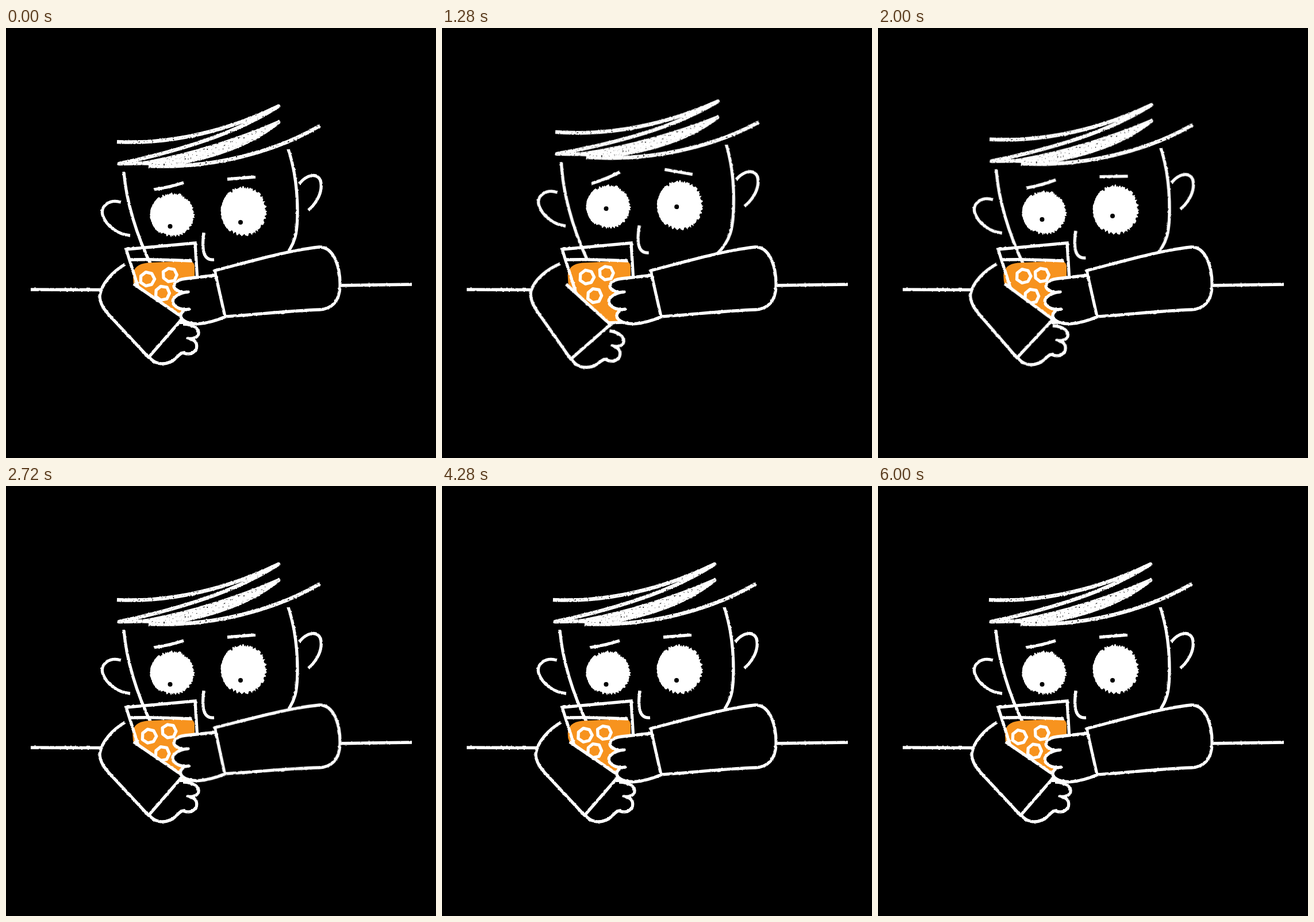
Recreate the animation shown at these times as an HTML page. Size 748 by 748 pixels, loop 6040 ms.

```html
<!DOCTYPE html>
<html lang="en">
<head>
<meta charset="utf-8">
<title>Quiet drink</title>
<style>
  html, body { margin: 0; width: 100%; height: 100%; overflow: hidden; background: #000; }
  svg { display: block; width: 100vw; height: 100vh; }
  .line { fill: none; stroke: #fff; stroke-width: 5.3; stroke-linejoin: round; }
  .hair { stroke-width: 6.5; }
  .solid { fill: #000; }
  .rough { filter: url(#rough); }
  .grain { filter: url(#grain); }
</style>
</head>
<body>
<svg viewBox="0 0 748 748">
  <defs>
    <filter id="rough" filterUnits="userSpaceOnUse" x="0" y="0" width="748" height="748" color-interpolation-filters="sRGB">
      <feTurbulence type="fractalNoise" baseFrequency=".2" numOctaves="2" seed="4"/>
      <feDisplacementMap in="SourceGraphic" scale="2.5" xChannelSelector="R" yChannelSelector="G"/>
    </filter>
    <filter id="grain" filterUnits="userSpaceOnUse" x="0" y="0" width="748" height="748" color-interpolation-filters="sRGB">
      <feTurbulence type="fractalNoise" baseFrequency=".3" numOctaves="2" seed="7" result="noise"/>
      <feColorMatrix in="noise" values="0 0 0 0 0  0 0 0 0 0  0 0 0 0 0  0 0 0 -6 5" result="holes"/>
      <feDisplacementMap in="SourceGraphic" in2="noise" scale="2.5" xChannelSelector="R" yChannelSelector="G"/>
      <feComposite in2="holes" operator="in"/>
    </filter>
  </defs>
  <rect width="748" height="748"/>

  <path class="line rough" d="M43 455L175 455.5M570 448L706 446"/>

  <g id="head">
    <g class="line rough">
      <path d="M205 250C209 300 226 360 256 420"/>
      <path d="M491 211C504 250 507 285 507 320C507 355 504 378 480 402"/>
      <path d="M200 303C180 297 164 310 168 325C174 344 194 359 216 361"/>
      <path d="M510 271C524 254 541 252 547 265C552 284 541 304 526 317"/>
      <path d="M344 356C340 388 344 405 362 403"/>
      <path id="browL" d="M257 281Q285 277 309 269"/>
      <path id="browR" d="M385 263L434 259"/>
    </g>
    <g class="line hair grain">
      <path d="M193 198C290 203 390 177 474 136C400 184 300 214 197 236L250 235"/>
      <path d="M240 235C320 222 410 192 474 164C430 200 360 227 285 237Z" fill="#fff"/>
      <path d="M248 240C360 245 470 215 546 170"/>
    </g>
    <path id="eyeL" fill="#fff"/>
    <path id="eyeR" fill="#fff"/>
    <g id="pupils">
      <circle cx="285.5" cy="345" r="4"/>
      <circle cx="408" cy="338" r="4"/>
    </g>
  </g>

  <path id="juice" fill="#f7931e"/>
  <path class="line rough" style="stroke-linejoin: miter" d="M250 514L209 385L329 374L333 440L318 512L255 514M216 403Q270 402 323 405"/>
  <g id="bubbles" class="line"></g>

  <g id="armL">
    <g class="line rough">
      <path class="solid" d="M248 571C258 585 273 587 288 580C297 575 302 565 308 565C318 569 326 567 331 558C334 547 327 541 316 540C328 542 336 536 335 529C333 520 322 515 308 515"/>
      <path class="solid" d="M207 411C185 424 166 445 163 466C163 480 172 491 180 500L248 573L308 504L222 445"/>
    </g>
  </g>

  <g id="armR">
    <g class="line rough">
      <path class="solid" d="M366 430L312 436C293 438 286 451 298 456Q306 462 317 459C301 460 287 470 291 479C296 488 307 491 319 489C306 490 300 500 307 507C320 519 350 516 382 502"/>
      <path class="solid" d="M363 422C430 405 490 387 545 381C570 381 582 415 581 450C580 475 567 489 545 490C490 492 440 498 381 502Z"/>
    </g>
  </g>
</svg>
<script>
const LOOP = 6040, STEP = 40, TURN = Math.PI * 2;
const $ = id => document.getElementById(id);
const set = (id, name, value) => $(id).setAttribute(name, value);
const move = (id, x, y, angle, cx, cy) =>
  set(id, 'transform', `translate(${x} ${y}) rotate(${angle} ${cx} ${cy})`);
const ease = x => { x = Math.min(1, Math.max(0, x)); return x * x * (3 - 2 * x); };

let seed = 11;
const random = () => (seed = seed * 16807 % 2147483647) / 2147483647;

// Closed polygon around a centre; radius(angle) scales the ellipse.
function blob(cx, cy, rx, ry, count, radius) {
  const points = Array.from({ length: count }, (_, i) => {
    const a = i / count * TURN, k = radius(a);
    return (cx + rx * k * Math.cos(a)).toFixed(1) + ' ' + (cy + ry * k * Math.sin(a)).toFixed(1);
  });
  return 'M' + points.join('L') + 'Z';
}

// Frayed edge, calmer on the left side of the eye.
const fray = a => 1.01 - (Math.cos(a) < -.6 ? .03 : .12) * random();
set('eyeL', 'd', blob(289.5, 325, 39, 39, 150, fray));
set('eyeR', 'd', blob(414, 319, 40.5, 44, 150, fray));

const rings = [0, 1, 2].map(() => {
  const ring = document.createElementNS('http://www.w3.org/2000/svg', 'path');
  ring.setAttribute('d', blob(0, 0, 12.3, 12.3, 7, () => .93 + .14 * random()));
  return $('bubbles').appendChild(ring);
});

// Rise, short hold and fall of the head.
const lift = t => t < 1300 ? ease((t - 280) / 960) : ease((2320 - t) / 960);

function draw(t) {
  const up = lift(t), look = lift(t - 150);
  move('head', 4 * up, -12 * up, 1.78 * up, 360, 200);
  move('browL', 0, 0, -11 * up, 283, 275);
  move('browR', 0, 0, 13 * up, 410, 261);
  move('pupils', 0, -17 * look, 0, 0, 0);
  move('armL', -24 * up, 3 * up, 7.9 * up, 248, 573);

  const nudge = t > 2620 && t < 5980 ? (1 - Math.cos((t - 2620) / 560 * TURN)) / 2 : 0;
  move('armR', 0, 0, 1.8 * nudge, 550, 440);

  // Bubbles float on slow waves that close with the loop.
  const wave = (n, degrees) => Math.cos(n * (t / LOOP - degrees / 360) * TURN);
  const sway = wave(2, 105);
  [
    [249 + 2 * wave(1, 110) + 2.7 * sway, 434.5 + 3 * wave(2, 20)],
    [284 + 2 * wave(1, 60), 427.5 + 2 * wave(3, 0)],
    [268.5 - 3.5 * wave(2, 85), 463 + 3.5 * wave(1, 120)]
  ].forEach(([x, y], i) => rings[i].setAttribute('transform', `translate(${x} ${y})`));

  const left = 219.5 - 1.5 * sway;
  set('juice', 'd', `M${left} 430Q${left + 1} 411 ${left + 25} 408.5L316 405Q327 405 328 414V440L317 511H250L${left + 1} 446Z`);
}

function tick(now) {
  draw(Math.floor(now % LOOP / STEP) * STEP);
  requestAnimationFrame(tick);
}
draw(0);
requestAnimationFrame(tick);
</script>
</body>
</html>
```
